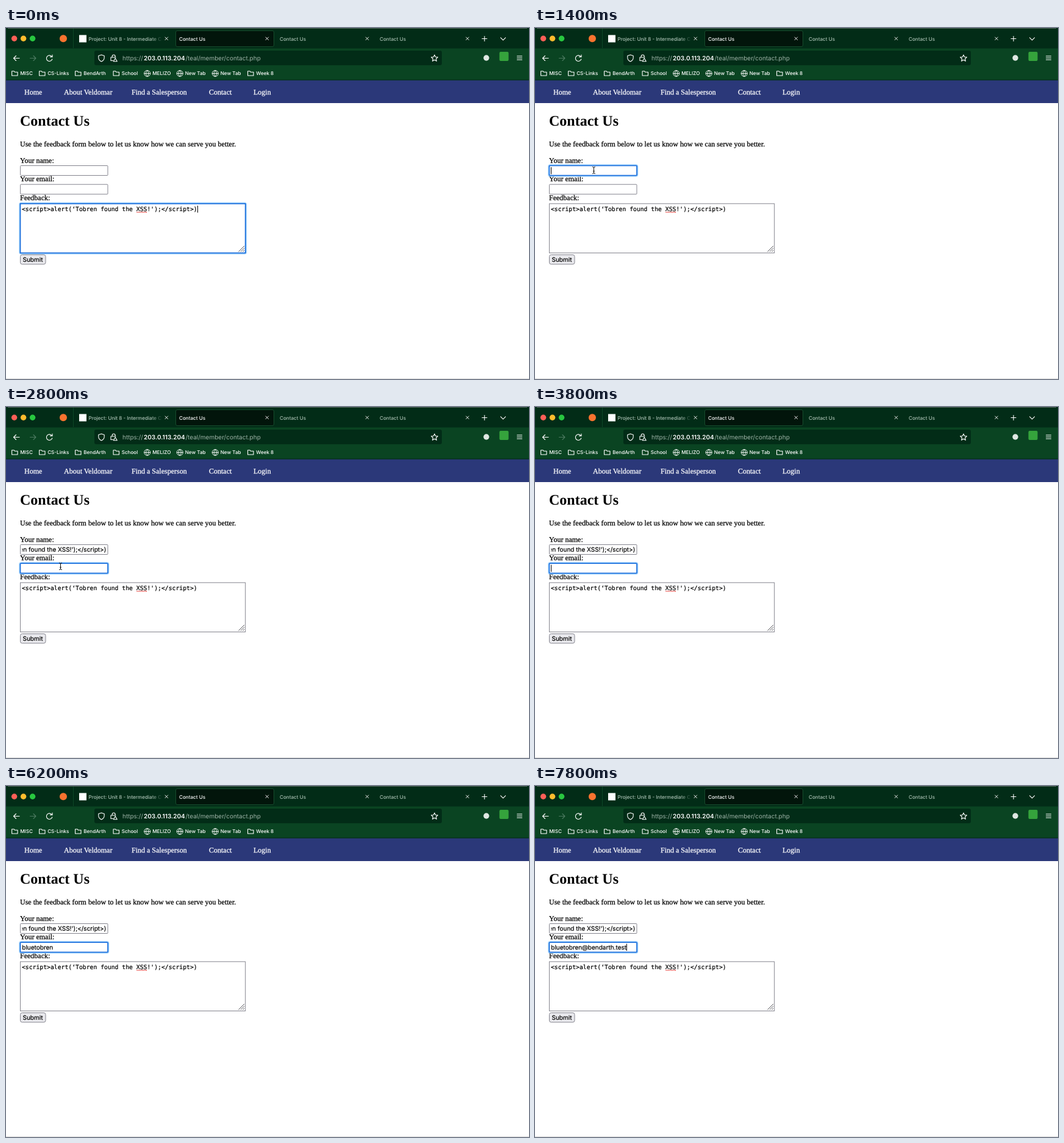
Write an HTML page that moves like this. It is 858 by 575 pixels and loops after 8000 ms.

```html
<!DOCTYPE html>
<html lang="en">
<head>
<meta charset="utf-8">
<title>Contact form</title>
<style>
  html, body { margin: 0; width: 100%; height: 100%; overflow: hidden; background: #fff; }
  svg { display: block; width: 858px; height: 575px; text-rendering: geometricPrecision; }
  text { white-space: pre; }
  .ui { font: 500 8.1px Inter, sans-serif; fill: #fff; }
  .dim { fill: #a9c0b2; }
  .url { font: 10px Inter, sans-serif; fill: #9db3a6; }
  .host { font-weight: 600; fill: #fff; }
  .serif { font: 12px "Liberation Serif", serif; stroke: #000; stroke-width: .25; }
  .nav { fill: #fff; stroke: #fff; }
  .title { font: bold 24px "Liberation Serif", serif; }
  .input { font: 10px Inter, sans-serif; stroke: #000; stroke-width: .2; }
  .mono { font: 9.75px "DejaVu Sans Mono", monospace; stroke: #000; stroke-width: .2; }
  .icon { fill: none; stroke: #fff; stroke-width: 1.1; stroke-linecap: round; stroke-linejoin: round; }
  .thin { stroke-width: .9; }
  .field { fill: #fff; stroke: #85858f; }
  .field.hover { stroke: #55555f; }
  .field.focus { stroke: #1268da; stroke-width: 1.6; }
  .glow { fill: none; stroke: #9fd0fb; stroke-width: 4.6; }
</style>
</head>
<body>
<svg viewBox="0 0 858 575">
  <defs>
    <linearGradient id="fade" gradientUnits="userSpaceOnUse" x1="238" x2="257">
      <stop stop-color="#a9c0b2"/><stop offset="1" stop-color="#a9c0b2" stop-opacity="0"/>
    </linearGradient>
    <clipPath id="nameClip"><path d="M26.5 226h139v15h-139z"/></clipPath>
  </defs>

  <!-- Browser window -->
  <path fill="#022c17" d="M0 0h858v34H0z"/>
  <path fill="#0a4422" d="M0 33.5h858V86H0z"/>
  <path fill="#52655b" d="M3 0h852v1H3z"/>
  <path fill="#0d4827" d="M110 1h1v32h-1z"/>
  <rect x="278.5" y="4.5" width="161" height="26" rx="2.5" fill="#02150b" stroke="#164a2c"/>
  <rect x="145" y="37" width="570" height="24" rx="3" fill="#022c17"/>
  <circle cx="13.6" cy="17.3" r="4.7" fill="#fe5f57"/>
  <circle cx="28.6" cy="17.3" r="4.7" fill="#febc2e"/>
  <circle cx="43.6" cy="17.3" r="4.7" fill="#28c840"/>
  <circle cx="94" cy="17.3" r="6" fill="#f9732f"/>
  <path fill="#fff" d="M120 11.5h12v12h-12z"/>
  <text class="ui" x="135.5" y="20.8" style="fill:url(#fade)">Project: Unit 8 - Intermediate C</text>
  <g id="tabs"></g>

  <g class="icon">
    <path d="M781 17.5h8m-4-4v8M811.5 15.8l4 4 4-4"/>
    <path d="M22 49.5H12.5m4-4l-4 4 4 4"/>
    <path stroke="#4d7a60" d="M39.5 49.5H49m-4-4l4 4-4 4"/>
    <path d="M75.2 47a4.8 4.8 0 1 0 .6 4M76 44v3.4h-3.4"/>
    <path d="M156.5 44l4.7 1.6v3q0 4.4-4.7 6.4-4.7-2-4.7-6.4v-3z"/>
    <path d="M174.2 48v-1.5a2.5 2.5 0 0 1 5 0V48M175.5 53.5H172V48h8M179.3 49.5l3 5.2h-6z"/>
    <path d="M703 44l1.6 3.5 3.8.4-2.9 2.6.9 3.8-3.4-2-3.4 2 .9-3.8-2.9-2.6 3.8-.4z"/>
    <path d="M838.5 46h8m-8 3h8m-8 3h8"/>
  </g>
  <circle cx="788" cy="49" r="4.7" fill="#dfe8e2"/>
  <rect x="809.5" y="39" width="15" height="15" rx="2" fill="#35a33c"/>
  <text class="url" y="53"><tspan x="191">https://</tspan><tspan x="226" class="host">203.0.113.204</tspan><tspan x="294.5">/teal/member/contact.php</tspan></text>
  <g id="bookmarks"></g>

  <!-- Page -->
  <path fill="#2b3879" d="M0 85.5h858V123H0z"/>
  <path fill="#052b18" d="M0 84.5h858v1H0z"/>
  <g class="serif nav">
    <text x="30" y="109">Home</text>
    <text x="95" y="109">About Veldomar</text>
    <text x="206" y="109">Find a Salesperson</text>
    <text x="333" y="109">Contact</text>
    <text x="406" y="109">Login</text>
  </g>
  <text class="title" x="23" y="160">Contact Us</text>
  <g class="serif">
    <text x="23" y="194">Use the feedback form below to let us know how we can serve you better.</text>
    <text x="23" y="220.5">Your name:</text>
    <text x="23" y="251.2">Your email:</text>
    <text x="23" y="282.2">Feedback:</text>
  </g>
  <rect class="glow" id="glow" rx="1.5"/>
  <rect class="field" id="name" x="23.5" y="225.5" width="143.5" height="16" rx="1"/>
  <rect class="field" id="email" x="23.5" y="256.2" width="143.5" height="16" rx="1"/>
  <rect class="field" id="feedback" x="23.5" y="287.8" width="369.2" height="80.7"/>
  <g clip-path="url(#nameClip)">
    <text class="input" id="nameText" x="164.3" y="237.3" text-anchor="end"></text>
  </g>
  <text class="input" id="emailText" x="26.3" y="268"></text>
  <text class="mono" id="feedbackText" x="26" y="300.3"></text>
  <path stroke="#e3342f" stroke-width="1.4" stroke-dasharray="1.5 1" d="M214.5 301.8h17"/>
  <path stroke="#55555a" d="M381.5 366.5l9.5-9.5m-6 9.5l6-6m-2.5 6l2.5-2.5"/>
  <rect x="23.5" y="371.5" width="41.5" height="15.5" rx="3" fill="#e9e9ed" stroke="#85858f"/>
  <text class="input" x="27.5" y="383">Submit</text>
  <path fill="#dcdcdc" d="M0 574h858v1H0z"/>
  <path id="caret" stroke="#000" d="M0 0v11.5"/>
  <path id="beam" fill="none" stroke="#111" d="M-2.3-5.5Q0-5.5 0-4Q0-5.5 2.3-5.5M0-4.5v9M-2.3 5.5Q0 5.5 0 4Q0 5.5 2.3 5.5M-1.3 1.5h2.6"/>
  <path id="arrow" stroke="#fff" stroke-width=".9" d="M0 0v10.3l2.4-2.2 1.7 4 1.9-.8-1.7-3.9h3.3z"/>
</svg>
<script>
const LOOP = 8000, STEP = 200;
const PAYLOAD = "<script>alert(‘Tobren found the XSS!');<\/script>)";
const EMAIL = "bluetobren@bendarth.test";
const $ = id => document.getElementById(id);
const show = (el, on) => el.style.display = on ? "" : "none";
const move = (el, x, y) => el.setAttribute("transform", `translate(${x} ${y})`);

const label = (x, y, text, cls = "") => `<text class="ui ${cls}" x="${x}" y="${y}">${text}</text>`;
const cross = x => `<path class="icon thin" d="M${x - 2.3} 15l4.6 4.6m0-4.6l-4.6 4.6"/>`;
$("tabs").innerHTML = [263.3, 428.3, 592.5, 757].map(cross).join("") +
  label(284, 20.8, "Contact Us") + [449, 613].map(x => label(x, 20.8, "Contact Us", "dim")).join("");

const folder = x => `<path class="icon" d="M${x + .6} 78v-7.3h3.4l1.3 1.5h4.7V78z"/>`;
const globe = x => `<path class="icon thin" d="M${x + .7} 74.5a5 5 0 1 0 10 0a5 5 0 1 0-10 0h10m-5-5q-4.5 5 0 10q4.5-5 0-10"/>`;
$("bookmarks").innerHTML = [
  [folder, 9, "MISC"], [folder, 54, "CS-Links"], [folder, 113, "BendArth"], [folder, 175.5, "School"],
  [globe, 226, "MELIZO"], [globe, 279.5, "New Tab"], [globe, 337.5, "New Tab"], [folder, 396, "Week 8"]
].map(([icon, x, text]) => icon(x) + label(x + 14.2, 77.3, text)).join("");
$("feedbackText").textContent = PAYLOAD;

// Interpolates rows of [time, ...values].
function track(rows, t) {
  const next = rows.findIndex(row => row[0] > t);
  if (next < 1) return (next ? rows[rows.length - 1] : rows[0]).slice(1);
  const a = rows[next - 1], b = rows[next], k = (t - a[0]) / (b[0] - a[0]);
  return a.slice(1).map((v, i) => v + (b[i + 1] - v) * k);
}

const typing = [[3800, 0], [4400, 4], [4800, 4], [5800, 10], [6200, 10], [7600, EMAIL.length]];
const pointer = [[400, 112, 246], [800, 96, 233], [1600, 96, 233], [2000, 89, 261]];
const caretOff = [[2800, 3200], [4800, 5000], [6000, 6400]];
const between = (t, from, to) => t >= from && t < to;

function draw(t) {
  const focus = t < 1200 ? "feedback" : t < 2400 ? "name" : "email";
  for (const id of ["name", "email", "feedback"]) $(id).classList.toggle("focus", id === focus);
  $("name").classList.toggle("hover", between(t, 800, 1200));
  for (const key of ["x", "y", "width", "height"]) $("glow").setAttribute(key, $(focus).getAttribute(key));

  const pasted = t >= 1600;
  $("nameText").textContent = pasted ? PAYLOAD : "";
  $("emailText").textContent = EMAIL.slice(0, Math.round(track(typing, t)[0]));

  const caretAt = {
    feedback: [314.5, 291],
    name: [pasted ? 164.7 : 26.5, 228],
    email: [26.7 + $("emailText").getComputedTextLength(), 258.5]
  };
  move($("caret"), ...caretAt[focus]);
  show($("caret"), !caretOff.some(([from, to]) => between(t, from, to)));

  const [x, y] = track(pointer, t);
  const isArrow = between(t, 400, 800) || between(t, 1800, 2200);
  move($("beam"), x + .5, y);
  move($("arrow"), x, y - 4.5);
  show($("arrow"), isArrow);
  show($("beam"), !isArrow && between(t, 800, 3800) && !between(t, 1600, 1800));
}

function tick() {
  draw(Math.floor(performance.now() % LOOP / STEP) * STEP);
  requestAnimationFrame(tick);
}
tick();
</script>
</body>
</html>
```
